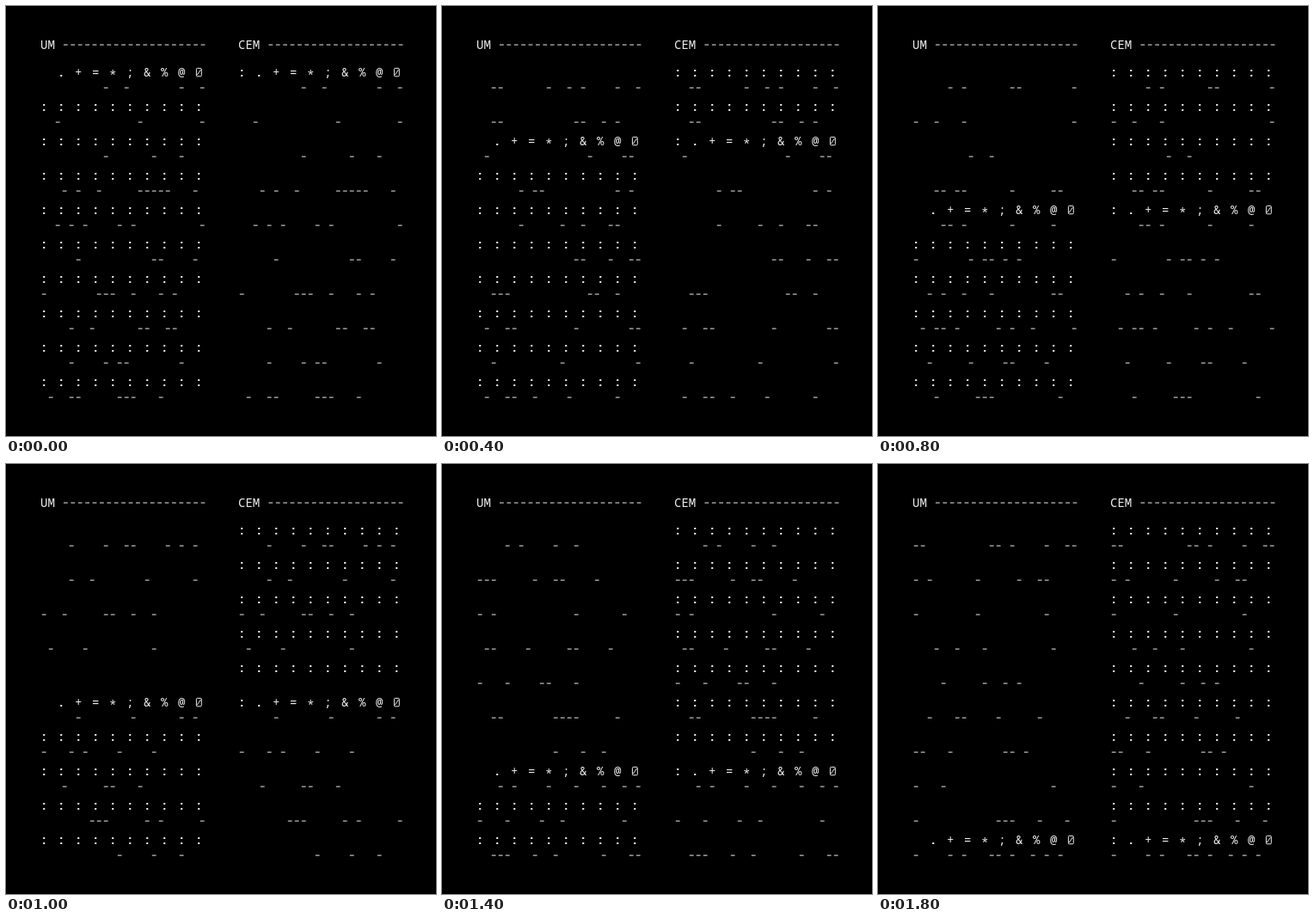
These frames come from a looping animation (500 px wide and 500 px high, 2000 ms). An HTML page with a canvas:

```html
<!DOCTYPE html>
<html lang="en">
<head>
<meta charset="utf-8">
<style>
  html, body { margin: 0; width: 100%; height: 100%; overflow: hidden; background: #000; }
  canvas { display: block; width: 500px; height: 500px; }
</style>
</head>
<body>
<canvas id="stage" width="500" height="500"></canvas>
<script>
const ctx = document.getElementById('stage').getContext('2d');
const ROWS = 10, COLS = 10, NOISE_COLS = 24;
const STEP_MS = 200, ROW_H = 40, CELL_W = 20;
const ADVANCE = 8.4;
const RAMP = '.+=*;&%@0';

// Repeatable value in [0, 1) for each step, row and column.
function noise(step, row, col) {
  let h = (step * ROWS + row) * NOISE_COLS + col + 7919;
  h = Math.imul(h ^ (h >>> 16), 0x45d9f3b);
  h = Math.imul(h ^ (h >>> 16), 0x45d9f3b);
  return ((h ^ (h >>> 16)) >>> 0) / 4294967296;
}

function dash(x, y) {
  ctx.fillRect(x + 1.8, y - 0.4, 4.8, 1);
}

function dot(x, y) {
  ctx.beginPath();
  ctx.roundRect(x + 3.1, y - 2, 2.2, 2.1, 0.6);
  ctx.fill();
}

function slashedZero(x, y) {
  ctx.beginPath();
  ctx.roundRect(x + 1.4, y - 9.6, 5.9, 9.4, 1);
  ctx.moveTo(x + 2, y - 1.6);
  ctx.lineTo(x + 6.7, y - 8.2);
  ctx.stroke();
}

const shapes = {
  '0': slashedZero,
  '.': dot,
  ':': (x, y) => { dot(x, y); dot(x, y - 6); },
  '*': (x, y) => ctx.fillText('*', x, y + 3),
};

function glyph(char, x, y) {
  if (shapes[char]) shapes[char](x, y);
  else ctx.fillText(char, x, y);
}

function title(text, x, dashes) {
  ctx.fillText(text, x, 50);
  const start = x + (text.length + 1) * ADVANCE;
  for (let i = 0; i < dashes; i++) dash(start + i * ADVANCE, 45);
}

function symbols(line, x, y) {
  [...line].forEach((char, i) => {
    if (char !== ' ') glyph(char, x + i * CELL_W, y);
  });
}

function panel(x, step, before, after, lead) {
  for (let row = 0; row < ROWS; row++) {
    const y = 82 + row * ROW_H;
    const line = row === step ? lead + RAMP : (row < step ? before : after).repeat(COLS);
    symbols(line, x, y);
    for (let col = 0; col < NOISE_COLS; col++) {
      if (noise(step, row, col) < 0.2) dash(x + col * 8, y + 13);
    }
  }
}

function draw(time) {
  const step = Math.floor(time / STEP_MS) % ROWS;
  ctx.fillStyle = '#000';
  ctx.fillRect(0, 0, 500, 500);
  ctx.fillStyle = ctx.strokeStyle = '#ebebeb';
  ctx.lineWidth = 1;
  ctx.font = '14px "Noto Sans Mono", monospace';
  ctx.textBaseline = 'alphabetic';

  title('UM', 40, 20);
  title('CEM', 270, 19);
  panel(40, step, ' ', ':', ' ');
  panel(270, step, ':', ' ', ':');
}

function tick() {
  draw(performance.now());
  requestAnimationFrame(tick);
}
tick();
</script>
</body>
</html>
```
